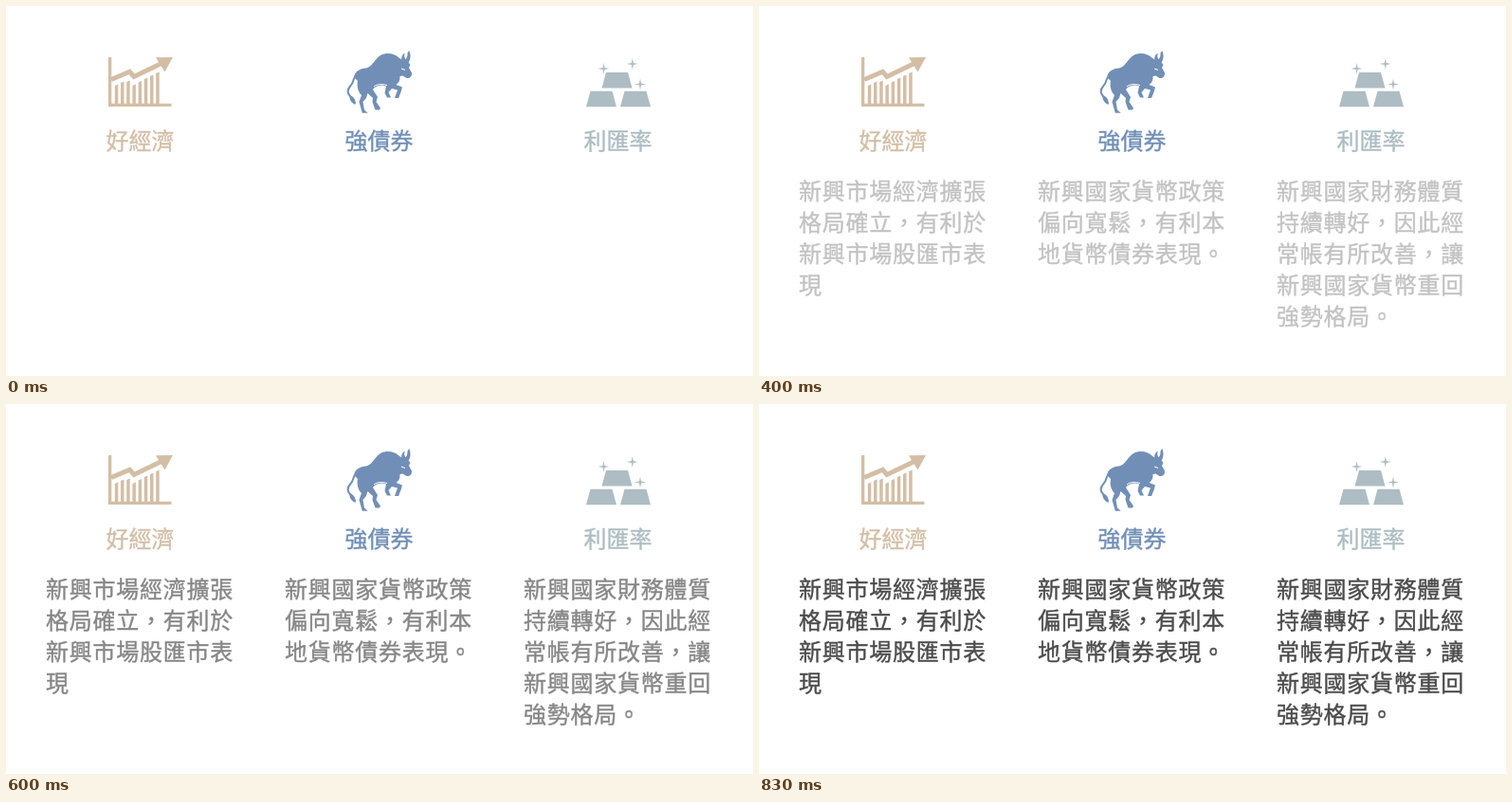
An HTML page that plays this animation: 788x390 px, repeating every 1.03 s.

```html
<!DOCTYPE html>
<html lang="zh-Hant">
<head>
<meta charset="utf-8">
<title>好經濟 強債券 利匯率</title>
<style>
  html, body { margin: 0; width: 100%; height: 100%; overflow: hidden; background: #fff; }
  svg { display: block; width: 788px; height: 390px; }
  text {
    font: 400 24px "Noto Sans CJK TC", "Noto Sans CJK", "Noto Sans CJK JP", sans-serif;
    fill: currentColor; stroke: currentColor; stroke-width: .4px;
  }
  .title { text-anchor: middle; }
  #body { color: #4b4b4b; opacity: 0; }
  #body text { letter-spacing: .75px; }
  .economy { color: #d3bea5; }
  .bonds { color: #718fb6; }
  .currency { color: #adbdc3; }
  path { fill: currentColor; }
  .line { fill: none; stroke: currentColor; }
</style>
</head>
<body>
<svg viewBox="0 0 788 390">
  <g class="economy">
    <path d="M108 54h3.3v48.7h63.2v3.3H108z"/>
    <path id="bars"/>
    <path class="line" stroke-width="5" d="M111 77.5L130.5 69.3L135 74.5L166 59.5"/>
    <path d="M158 54.3L176 54L167.5 69.5z"/>
    <text class="title" x="141.5" y="150.5">好經濟</text>
  </g>

  <g class="bonds">
    <!-- body and head -->
    <path d="M367 75C368 69 373 66 380 65.5C387 64 389 55 396 51.5C402 48.5 410 50 414.5 54.5
      L418 57C421 57.5 424 55 423.5 49.5L425.3 47C427.2 51 427 56 424.7 59.5L426.5 62L425 65
      L428 70.5C428.5 74 426 76.5 422.5 76L418.5 73.5L415.5 74C416 78 414.5 81 411.5 83
      L418 85.5L416.5 91L414 97H410L413 88.5L407 87L403.5 91L406 96.5H402L399.5 91.5L401 84.5
      C396 82.5 390 84 387 88L392 96L390.5 101L395 107.5L394 109.5H389.5L386.5 101L387 97
      L381.5 92L380 97L376.5 101L378 109.5L381.8 112.8H375.8L372.5 101L375 94
      C371 90 370 84 371 79z"/>
    <!-- horn and tail -->
    <path d="M417.5 58C416.5 54 418 51.5 420.7 49.5C419.7 53 420.3 55 422.5 57.5z"/>
    <path class="line" stroke-width="2" d="M371 74C365 74 368 80 363.5 84C360 88 360 92 363 95C366 98 366.5 100 368 103"/>
    <path d="M362.5 94.5C367 95 369 99 368.8 103.8C364.5 102.5 362 99 362.5 94.5z"/>
    <path class="line" style="stroke:#fff" stroke-width="1" d="M417 66L421 67.5M388 85C392 82 397 82 402 83.5"/>
    <text class="title" x="393.5" y="150.5">強債券</text>
  </g>

  <g class="currency">
    <path d="M633 70h23l4.5 16.5h-32zM616.5 89.7h23l4.5 16.5h-32zM652.5 89.7h23l4.5 16.5h-32z"/>
    <path id="sparkles"/>
    <text class="title" x="645.5" y="150.5">利匯率</text>
  </g>

  <g id="body"></g>
</svg>
<script>
const LOOP = 1030;
const STEPS = [230, 330, 400, 470, 530, 600, 670, 730, 830];
const body = document.getElementById("body");

const columns = [
  [42, "新興市場經濟擴張", "格局確立，有利於", "新興市場股匯市表", "現"],
  [294, "新興國家貨幣政策", "偏向寬鬆，有利本", "地貨幣債券表現。"],
  [546, "新興國家財務體質", "持續轉好，因此經", "常帳有所改善，讓", "新興國家貨幣重回", "強勢格局。"]
];
for (const [x, ...lines] of columns) {
  lines.forEach((line, row) => {
    const text = document.createElementNS("http://www.w3.org/2000/svg", "text");
    text.setAttribute("x", x);
    text.setAttribute("y", 203.8 + row * 33);
    text.textContent = line;
    body.append(text);
  });
}

const barTops = [83, 80, 79, 83, 79.5, 76, 73, 70];
document.getElementById("bars").setAttribute("d",
  barTops.map((top, i) => `M${114.8 + i * 6.2} ${top + 1}l3.5 -1.6V103h-3.5z`).join(""));

const sparkle = (x, y) =>
  `M${x} ${y - 6}L${x + 1} ${y - 1}L${x + 6} ${y}L${x + 1} ${y + 1}` +
  `L${x} ${y + 6}L${x - 1} ${y + 1}L${x - 6} ${y}L${x - 1} ${y - 1}z`;
document.getElementById("sparkles").setAttribute("d",
  sparkle(630.5, 66) + sparkle(660.8, 61) + sparkle(669, 82.5));

// The body text fades in by equal, held steps.
function draw() {
  const time = performance.now() % LOOP;
  body.style.opacity = STEPS.filter(step => time >= step).length / STEPS.length;
  requestAnimationFrame(draw);
}
draw();
</script>
</body>
</html>
```
